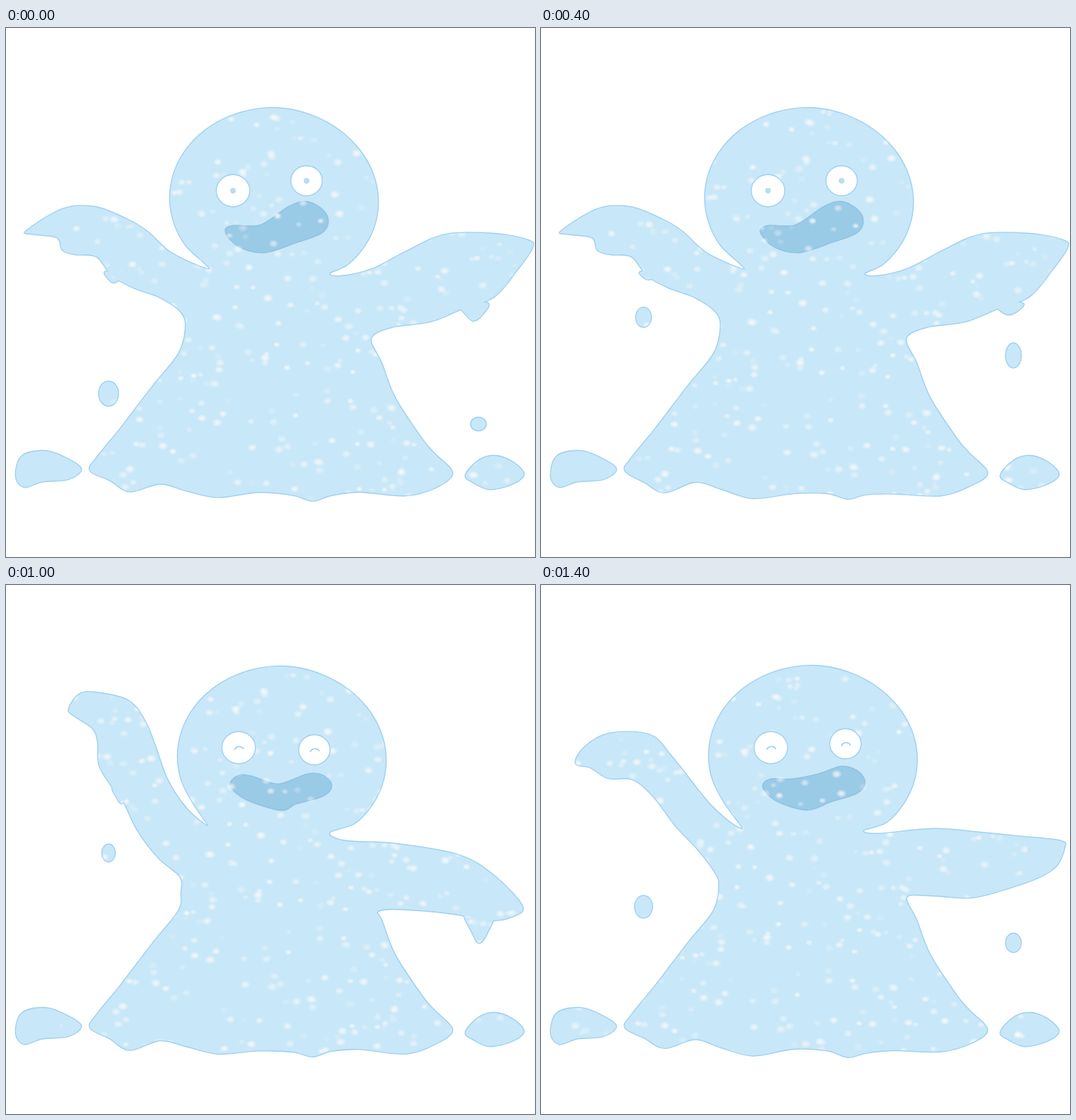
Animation of 748 by 748 pixels, one loop 1600 ms. Source, as an HTML page with a canvas:

```html
<!DOCTYPE html>
<html lang="en">
<head>
<meta charset="utf-8">
<title>Waving slime</title>
<style>
html, body { margin: 0; height: 100%; overflow: hidden; background: #fff; }
canvas { display: block; width: 748px; height: 748px; }
</style>
</head>
<body>
<canvas id="stage" width="748" height="748"></canvas>
<script>
const ctx = document.getElementById('stage').getContext('2d');
const FILL = '#c8e7f8', EDGE = '#9fd1ef', MOUTH = '#99cae6', MOUTH_EDGE = '#8fc2e1';
const STEP = 200, POSES = [0, 0, 0, 0, 1, 2, 2, 1];

const points = text => text.trim().split(/\s+/).map(s => s.split(',').map(Number));
const mix = (a, b, t) => a.map((p, i) => p.map((v, j) => v + (b[i][j] - v) * t));

// Key outlines of the arms: at rest, halfway, fully swung
const leftArms = [
  `254,425 248,402 218,381 180,367 150,350 128,323 98,320 80,314 72,296 35,291 30,286
   80,256 125,253 170,270 200,288 235,319 288,341`,
  `252,425 246,406 222,374 190,340 160,300 130,275 95,273 70,258 49,252 62,229 97,210
   154,212 185,243 235,306 265,334 285,344`,
  `248,435 246,412 215,385 185,345 165,303 150,285 132,255 130,222 122,202 95,184 89,175
   103,155 125,152 172,163 195,190 210,225 228,275 256,317 286,341`
].map(points);
const rightArms = [
  `457,347 475,351 520,340 570,314 622,292 690,291 738,300 744,311 722,343 690,380 645,397
   600,415 545,423 516,439`,
  `456,347 475,352 555,345 620,350 680,356 735,362 740,372 728,398 700,415 650,432 607,442
   555,439 517,441`,
  `457,350 480,362 550,366 640,382 690,411 730,454 715,469 685,474 640,466 600,461 545,458 525,462`
].map(points);
const leftDrips = points('152,350 168,294 163,290');
const rightDrips = points('661,394 653,428 669,468');

const hem = points(`531,474 550,523 588,581 606,602 631,629 608,648 565,661 500,657 460,660 434,667
  405,659 357,657 300,664 255,653 218,643 175,656 147,641 119,626 128,608 163,565 208,506 244,461`);
const puddles = [
  '14,634 22,606 52,598 78,605 106,623 88,638 52,641 26,649',
  '650,632 668,612 690,605 715,613 732,631 715,645 684,652 660,642'
].map(points);
const grin = points('311,289 320,280 360,279 400,253 425,246 448,258 455,275 445,290 410,303 365,317 330,309');
const laugh = points('318,284 328,270 348,271 385,282 425,268 447,269 460,283 448,298 410,309 388,318 340,303');

// Closed Catmull-Rom curve
function curve(p) {
  const path = new Path2D(), n = p.length, at = i => p[(i + n) % n];
  path.moveTo(...p[0]);
  for (let i = 0; i < n; i++) {
    const [a, b, c, d] = [at(i - 1), at(i), at(i + 1), at(i + 2)];
    path.bezierCurveTo(b[0] + (c[0] - a[0]) / 6, b[1] + (c[1] - a[1]) / 6,
      c[0] - (d[0] - b[0]) / 6, c[1] - (d[1] - b[1]) / 6, ...c);
  }
  path.closePath();
  return path;
}

function oval(x, y, rx, ry) {
  const path = new Path2D();
  path.ellipse(x, y, rx, ry, 0, 0, 7);
  return path;
}

// Slightly egg-shaped arc from the left side of the neck to the right
function head(lean) {
  return Array.from({ length: 17 }, (_, i) => {
    const a = (148 + 257 * i / 16) * Math.PI / 180, c = Math.cos(a);
    return [379 + 11 * lean + 147 * c, 240 + 2 * lean + 127 * Math.sin(a) + 6 * Math.max(0, c)];
  });
}

function drip([x, y], length, width) {
  return curve([[x - width, y - 5], [x - width / 2, y + length * .6], [x, y + length],
    [x + width * .6, y + length * .6], [x + width, y - 5]]);
}

// Drops speed up as they fall; the right one lets go a step later
function drops(fall) {
  const list = [oval(145, 379 + 22 * fall + 8 * fall ** 2, 9 + 1.5 * fall, 12 + 1.7 * fall)];
  if (fall) list.push(oval(668, 431 + 26.5 * fall + 5.5 * fall ** 2, 10.5, 21 - 4 * fall));
  return list;
}

// Glitter sheet, moved as a whole for each picture
let seed = 7;
const rand = () => (seed = seed * 16807 % 2147483647) / 2147483647;
const glitter = Array.from({ length: 520 }, () => ({
  x: 86 + 649 * rand(), y: 80 + 620 * rand(), size: 5 + 3 * rand(), alpha: .15 + .7 * rand()
}));
const shifts = points('0,0 0,3 0,7 -6,-20 -2,-62 -10,-28 -20,-10 -47,32');

function sparkle({ x, y, size, alpha }) {
  ctx.save();
  ctx.translate(x, y);
  ctx.scale(size, size * .8);
  const g = ctx.createRadialGradient(0, 0, 0, 0, 0, 1);
  g.addColorStop(0, `rgba(255,252,253,${alpha})`);
  g.addColorStop(.4, `rgba(255,252,253,${alpha * .7})`);
  g.addColorStop(1, 'rgba(255,252,253,0)');
  ctx.fillStyle = g;
  ctx.fillRect(-1, -1, 2, 2);
  ctx.restore();
}

function drawGlitter(shapes, shift) {
  const area = new Path2D();
  shapes.forEach(s => area.addPath(s));
  ctx.save();
  ctx.clip(area);
  ctx.translate(...shift);
  ctx.beginPath();
  ctx.rect(86, 0, 649, 700);
  ctx.clip();
  glitter.forEach(sparkle);
  ctx.restore();
}

// Stroking everything first hides the seams where shapes overlap
function paint(shapes, fill, edge) {
  ctx.strokeStyle = edge;
  ctx.lineWidth = 2.8;
  shapes.forEach(s => ctx.stroke(s));
  ctx.fillStyle = fill;
  shapes.forEach(s => ctx.fill(s));
}

function drawEye(x, y, r, happy) {
  paint([oval(x, y, r, r - 1)], '#fff', EDGE);
  if (happy) {
    ctx.lineWidth = 1.8;
    ctx.beginPath();
    ctx.moveTo(x - 6, y + 3);
    ctx.bezierCurveTo(x - 3, y - 3, x + 4, y - 3, x + 7, y + 2);
    ctx.stroke();
  } else {
    ctx.fillStyle = '#b9ddf1';
    ctx.fill(oval(x, y, 4, 4));
  }
}

function draw(i) {
  const pose = POSES[i], lean = pose / 2, phase = i % 4;
  const hang = [20, 38, 11, 0][phase];
  const wavyHem = hem.map(([x, y]) => [x, y > 640 ? y + 1.5 * Math.sin(x / 30 + phase * Math.PI / 2) : y]);
  const body = curve([...head(lean), ...rightArms[pose], ...wavyHem, ...leftArms[pose]]);
  const slime = [body, ...puddles.map(curve), ...drops((phase + 3) % 4)];
  if (hang) slime.push(drip(rightDrips[pose], hang, 20), drip(leftDrips[pose], hang / 2, 12));

  ctx.fillStyle = '#fff';
  ctx.fillRect(0, 0, 748, 748);
  paint(slime, FILL, EDGE);
  paint([curve(mix(grin, laugh, lean))], MOUTH, MOUTH_EDGE);
  drawGlitter(slime, shifts[i]);
  drawEye(321 + 8 * lean, 230, 23, pose > 0);
  drawEye(425 + 11 * lean, 216 + 17 * lean, 21.5, pose > 0);
}

let shown = -1;
function tick() {
  const i = Math.floor(performance.now() / STEP) % POSES.length;
  if (i !== shown) draw(shown = i);
  requestAnimationFrame(tick);
}
tick();
</script>
</body>
</html>
```
